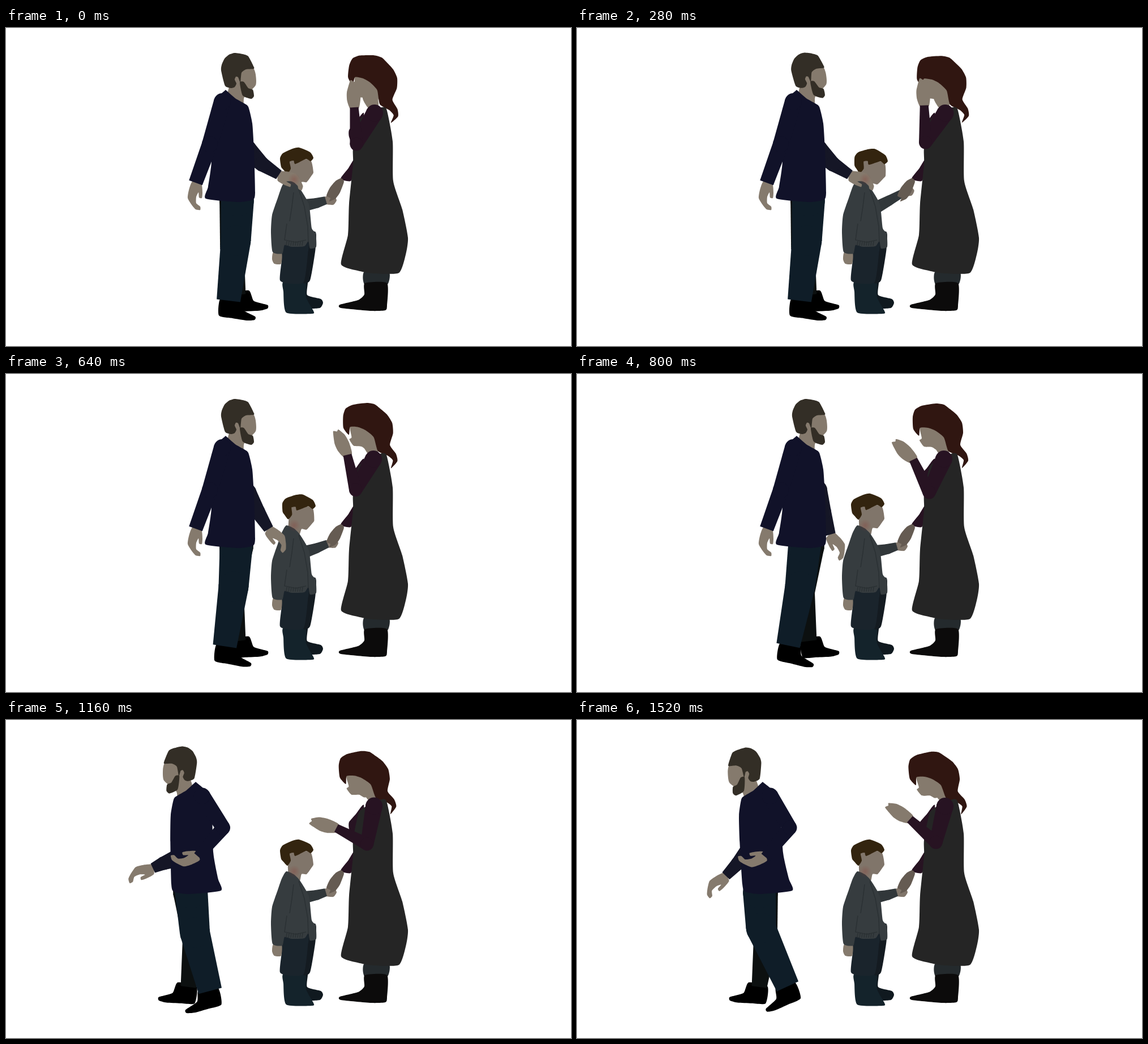
An HTML page with a canvas for the animation above (1600 ms loop, 998 px wide and 561 px high).

```html
<!DOCTYPE html>
<html lang="en">
<head>
<meta charset="utf-8">
<title>Family</title>
<style>
html, body { margin: 0; width: 100%; height: 100%; overflow: hidden; background: #fff; }
canvas { display: block; }
</style>
</head>
<body>
<canvas id="stage" width="998" height="561"></canvas>
<script>
const ctx = document.getElementById('stage').getContext('2d');
const LOOP = 1600, STEP = 40, LAST = 1520, TURN = 880, MIRROR = 732;
const SKIN = '#857a6d', SHADE = '#655b52', BOY_SKIN = '#80756a';
const NAVY = '#111229', PLUM = '#271322', HAIR = '#332e26', BOOT = '#0c0b0b';
let now = 0;

const numbers = s => s.match(/-?[\d.]+/g).map(Number);

// A track is {time: "numbers"}; a plain string never moves.
const track = keys => Object.entries(typeof keys === 'string' ? { 0: keys } : keys)
  .map(([time, s]) => [+time, numbers(s)]);

function pose(keys) {
  const next = keys.findIndex(([time]) => time > now);
  if (next === 0) return keys[0][1];
  if (next < 0) return keys[keys.length - 1][1];
  const [t0, a] = keys[next - 1], [t1, b] = keys[next];
  const k = (now - t0) / (t1 - t0);
  return a.map((v, i) => v + (b[i] - v) * k);
}

// Softly rounded closed outline through a few points
function shape(fill, points) {
  const p = numbers(points), n = p.length, R = 0.1;
  const at = i => p[(i + n) % n];
  const path = new Path2D();
  path.moveTo(p[0], p[1]);
  for (let i = 0; i < n; i += 2) {
    const x = at(i + 2), y = at(i + 3);
    path.bezierCurveTo(
      at(i) + (x - at(i - 2)) * R, at(i + 1) + (y - at(i - 1)) * R,
      x - (at(i + 4) - at(i)) * R, y - (at(i + 5) - at(i + 1)) * R, x, y);
  }
  return () => { ctx.fillStyle = fill; ctx.fill(path); };
}

function line(points) {
  const p = numbers(points);
  return () => {
    ctx.beginPath();
    for (let i = 0; i < p.length; i += 2) ctx.lineTo(p[i], p[i + 1]);
    ctx.strokeStyle = '#2b3134';
    ctx.lineWidth = 1.5;
    ctx.stroke();
  };
}

// Motion keys hold dx, dy, degrees and shear about a pivot
function group(parts, px, py, keys) {
  const t = track(keys);
  return () => {
    const [dx, dy, angle, shear = 0] = pose(t);
    ctx.save();
    ctx.translate(px + dx, py + dy);
    ctx.rotate(angle * Math.PI / 180);
    ctx.transform(1, 0, -shear, 1, 0, 0);
    ctx.translate(-px, -py);
    parts.forEach(draw => draw());
    ctx.restore();
  };
}

function bone(x0, y0, w0, x1, y1, w1) {
  const a = Math.atan2(y1 - y0, x1 - x0), nx = -Math.sin(a) / 2, ny = Math.cos(a) / 2;
  ctx.beginPath();
  ctx.moveTo(x0 + nx * w0, y0 + ny * w0);
  ctx.lineTo(x1 + nx * w1, y1 + ny * w1);
  ctx.lineTo(x1 - nx * w1, y1 - ny * w1);
  ctx.lineTo(x0 - nx * w0, y0 - ny * w0);
  ctx.fill();
  ctx.beginPath();
  ctx.arc(x0, y0, w0 / 2, 0, 7);
  ctx.fill();
}

// Keys hold root, middle joint, end joint and the angle of the hand or foot
function limb(color, [w0, w1, w2], tip, keys, flip = 1) {
  const t = track(keys);
  return () => {
    const [x0, y0, x1, y1, x2, y2, angle] = pose(t);
    ctx.save();
    ctx.translate(x2, y2);
    ctx.rotate(angle * Math.PI / 180);
    ctx.scale(1, flip);
    tip();
    ctx.restore();
    ctx.fillStyle = color;
    bone(x0, y0, w0, x1, y1, w1);
    bone(x1, y1, w1, x2, y2, w2);
  };
}

const turning = (before, after) => () => (now < TURN ? before : after)();

function blush(x, y, r) {
  const g = ctx.createRadialGradient(x, y, 0, x, y, r);
  g.addColorStop(0, 'rgba(135,50,45,.3)');
  g.addColorStop(1, 'rgba(135,50,45,0)');
  return () => { ctx.fillStyle = g; ctx.fillRect(x - r, y - r, 2 * r, 2 * r); };
}

// Hands and feet start at the joint and point along x
const curledHand = shape(SKIN, '-2,6 2,-10 17,-12 27,-11 26,-6 17,-5 25,-1 36,-1 42,-8 48,-8 47,0 39,7 27,14 13,12');
const flatHand = shape(SKIN, '-2,-7 12,-12 27,-12 48,-5 45,1 47,5 34,11 18,12 -2,8');
const smallHand = shape(BOY_SKIN, '-2,-6 14,-8 19,0 13,8 -2,6');
const shoe = shape('#000', '-14,-4 20,-4 25,16 47,28 46,34 32,35 7,31 -17,26');

const boy = [
  shape('#10191f', '520,446 533,446 532,471 556,478 560,485 554,494 525,492'),
  shape('#14232b', '490,448 528,445 530,475 543,499 541,504 495,502 490,465'),
  shape('#141b21', '528,375 545,359 548,366 546,395 537,445 524,447'),
  shape('#1a242c', '490,382 533,378 533,400 526,448 500,451 484,445 487,410'),
  shape(SKIN, '472,396 487,397 486,416 474,416 470,408'),
  group([
    shape(BOY_SKIN, '503,234 537,232 543,254 540,260 531,272 522,272 518,285 500,277 498,250'),
    shape('#33240f', '486,245 484,230 489,221 506,213 518,211 537,219 543,229 538,235 530,231 511,240 508,234 501,236 503,248 497,257 490,250')
  ], 505, 272, { 0: '0 0 0', 280: '0 0 8.5', 480: '0 0 11', 800: '0 0 0' }),
  limb('#31373a', [22, 18, 14], smallHand, {
    0: '526 313 548 309 565 304 0',
    280: '526 318 552 304 577 290 -10',
    480: '526 316 548 306 571 295 -8',
    800: '526 313 548 309 565 304 0'
  }),
  shape('#363c3f', '495,267 508,272 519,283 535,311 540,353 547,362 548,386 537,389 534,376 527,385 505,386 492,383 488,398 471,395 468,360 470,330 480,300 487,280'),
  line('508,290 505,315 501,341'),
  line('517,284 527,315 533,350 534,378'),
  line('496,345 492,374 512,378 530,374')
];
for (let x = 496; x < 528; x += 4) boy.push(line(`${x},376 ${x - 1},384`));

const woman = [
  shape('#242a2d', '633,430 676,430 673,453 634,453'),
  shape(BOOT, '634,450 673,450 673,490 670,498 645,499 592,494 590,488 622,480 633,470'),
  shape(PLUM, '616,230 605,247 591,266 609,270 616,250'),
  shape(SHADE, '592,265 582,270 572,282 566,296 573,300 571,306 582,301 590,290 597,271'),
  shape(SKIN, '636,100 652,108 658,136 641,142 630,124'),
  group([
    shape(SKIN, '606,92 636,96 650,108 652,130 636,134 627,129 613,128 605,117 609,113'),
    shape('#301611', '604,109 594,97 593,76 597,63 609,56 634,52 648,54 659,62 671,72 680,86 682,104 677,125 688,140 691,153 680,166 683,152 674,144 656,136 648,112 633,100 620,95 606,95')
  ], 660, 130, { 0: '5 -1 8', 800: '0 0 0', 1320: '-4 2 -4' }),
  shape(PLUM, '632,150 618,166 606,180 606,192 613,205 630,200'),
  shape('#252525', '660,141 672,143 683,200 684,270 700,320 710,370 706,400 694,432 650,433 625,429 592,417 604,365 606,310 613,240 613,212 623,164 640,150'),
  limb(PLUM, [30, 23, 15], flatHand, {
    0: '651 150 619 205 615 140 -92',
    480: '650 150 613 200 612 134 -95',
    800: '648 150 622 209 594 151 -136',
    960: '649 151 630 215 584 169 -162',
    1320: '651 152 644 222 583 208 -168',
    1520: '650 152 634 216 588 175 -149'
  })
];

// The man is drawn facing right and mirrored once he turns
const man = [
  limb('#0c1010', [60, 42, 27], shoe, '407 303 399 385 410 471 -12'),
  limb('#0f1d28', [58, 53, 42], shoe, {
    560: '409 303 406 375 393 481 0',
    800: '402 303 394 375 373 479 5',
    960: '402 303 394 375 373 479 5',
    1320: '407 303 402 375 370 477 8',
    1520: '410 303 407 367 360 470 15'
  }),
  turning(
    limb('#151626', [36, 26, 18], curledHand, {
      280: '425 215 452 240 482 259 25',
      480: '425 215 453 242 480 264 38',
      800: '424 205 436 243 448 283 62'
    }, -1),
    limb('#151626', [32, 24, 18], curledHand, {
      960: '430 238 455 248 476 257 18',
      1320: '428 248 452 256 470 265 28',
      1520: '428 230 448 253 469 275 45'
    }, -1)),
  group([
    shape(SKIN, '403,86 414,77 424,71 437,71 441,82 441,101 421,122 419,134 404,127 392,118 394,104'),
    shape(HAIR, '380,75 381,65 386,54 394,47 404,44 418,46 428,50 438,69 437,72 424,73 416,79 414,96 410,87 406,86 404,91 407,98 404,104 398,106 387,102'),
    shape(HAIR, '413,96 420,95 428,106 436,109 438,120 433,125 418,119')
  ], 392, 106, { 0: '0 0 0', 280: '-.5 0 -2', 480: '0 0 0', 960: '0 0 0', 1320: '21.5 2 9' }),
  group([
    shape(NAVY, '389,110 405,124 419,132 428,139 435,168 438,215 440,290 436,303 410,307 353,301 357,280 363,235 362,150 372,124 386,111')
  ], 366, 300, { 0: '0 0 0 0', 960: '0 0 0 0', 1320: '-1 0 0 .09' }),
  turning(
    limb(NAVY, [30, 28, 25], curledHand, '382 130 360 205 335 273 90'),
    limb(NAVY, [29, 25, 19], curledHand, {
      960: '379 134 339 190 384 240 6',
      1320: '391 134 356 190 399 242 8'
    }))
];

const redness = blush(509, 267, 11);

function frame(ms) {
  now = Math.min(Math.floor(ms % LOOP / STEP) * STEP, LAST);
  ctx.fillStyle = '#fff';
  ctx.fillRect(0, 0, 998, 561);
  [...boy, ...woman].forEach(draw => draw());
  ctx.save();
  if (now >= TURN) ctx.transform(-1, 0, 0, 1, MIRROR, 0);
  man.forEach(draw => draw());
  ctx.restore();
  redness();
}

const start = performance.now();
function tick() {
  frame(performance.now() - start);
  requestAnimationFrame(tick);
}
tick();
</script>
</body>
</html>
```
